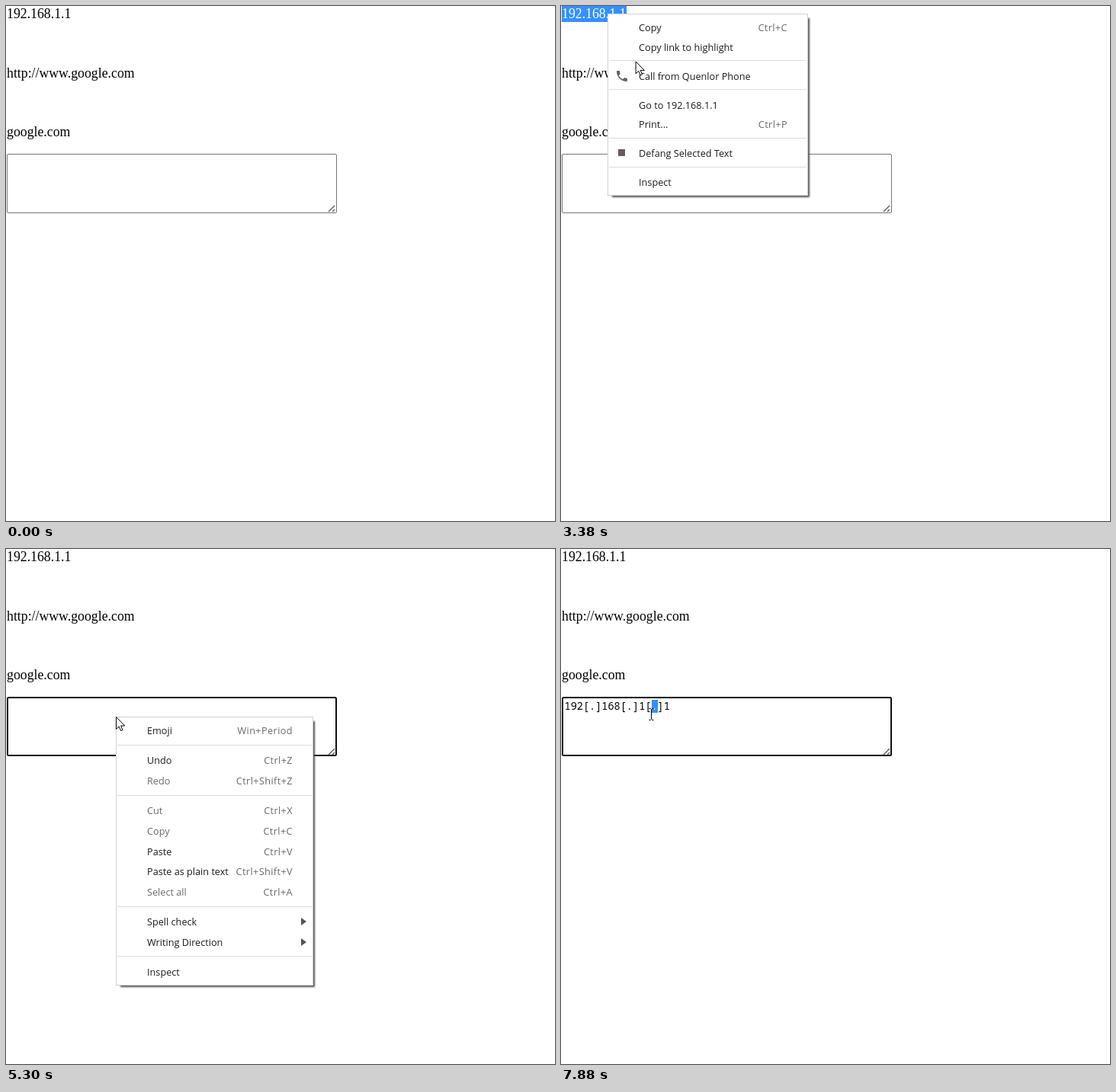
Animation of 720x676 px, one loop 8 s. Source, as an HTML page:

```html
<!DOCTYPE html>
<html lang="en">
<head>
<meta charset="utf-8">
<style>
  html, body { margin: 0; width: 100%; height: 100%; overflow: hidden; background: #fff; }
  svg { display: block; }
  .page { font: 17.78px "Liberation Serif", "Times New Roman", serif; }
  .mono { font: 13.57px "Noto Sans Mono", monospace; white-space: pre; }
  .menu { font: 12.7px "Open Sans", "Noto Sans", sans-serif; fill: #1c1c1c; }
  .menu .off, .menu .key { fill: #6a6a6a; }
  .key { text-anchor: end; letter-spacing: .4px; }
</style>
</head>
<body>
<svg id="stage" width="720" height="676" xmlns="http://www.w3.org/2000/svg">
  <defs><filter id="soft"><feGaussianBlur stdDeviation=".9"/></filter></defs>
  <g class="page">
    <rect id="ipMark" x="1" y="0" width="85" height="21" fill="#3390ff"/>
    <text id="ip" x="1" y="16">192.168.1.1</text>
    <text x="1" y="94">http://www.google.com</text>
    <text x="1" y="171">google.com</text>
  </g>
  <rect id="box" fill="#fff" rx="1.5"/>
  <path d="M423 270l8-8M428 270l3-3" stroke="#555" stroke-width="1.2"/>
  <rect id="dotMark" x="119" y="198" width="8" height="17" fill="#3390ff"/>
  <text id="pasted" class="mono" x="4.5" y="211">192[.]168[.]1[<tspan id="dot">.</tspan>]1</text>
  <rect id="caret" y="198" width="1" height="17"/>
  <g id="menus"></g>
  <path id="arrow" d="M.5.5V16.5L4.2 13 6.6 18.6 9 17.6 6.6 12.1H11.8Z" fill="#fff" stroke="#000"/>
  <path id="beam" d="M-3-7.5H-1L0-6.5 1-7.5H3M0-6.5V6.5M-3 7.5H-1L0 6.5 1 7.5H3" fill="none" stroke="#000"/>
</svg>
<script>
const LOOP = 8000;
const $ = id => document.getElementById(id);
const show = (id, on) => $(id).style.display = on ? "" : "none";
const attrs = (node, props) => {
  for (const k in props) node.setAttribute(k, props[k]);
  return node;
};
function add(parent, tag, props, text = "") {
  const node = attrs(document.createElementNS("http://www.w3.org/2000/svg", tag), props);
  node.textContent = text;
  return parent.appendChild(node);
}

// Items: [center y, label, shortcut, disabled]
function makeMenu({ x, y, w, h, keyX, half, seps, items, open, close }) {
  const g = add($("menus"), "g", { class: "menu" });
  add(g, "rect", { x: x + 6, y: y + 6, width: w - 4, height: h - 4, fill: "#555", filter: "url(#soft)" });
  add(g, "rect", { x: x + .5, y: y + .5, width: w - 1, height: h - 1, fill: "#fff", stroke: "#d2d2d2" });
  const bar = add(g, "rect", { x: x + 1, width: w - 2, height: half * 2, fill: "#e6e6e6" });
  for (const s of seps) add(g, "rect", { x: x + 2, y: s, width: w - 4, height: 1, fill: "#dcdcdc" });
  for (const [cy, label, key, off] of items) {
    add(g, "text", { x: x + 41, y: cy + 4.5, class: off ? "off" : "" }, label);
    if (key) add(g, "text", { x: keyX, y: cy + 4.5, class: "key" }, key);
  }
  const update = (t, px, py) => {
    const alpha = Math.min(clamp((t - open) / 130), clamp((close + 80 - t) / 80));
    g.style.opacity = alpha;
    g.style.display = alpha ? "" : "none";
    const hit = px > x && px < x + w && items.find(i => !i[3] && Math.abs(py - i[0]) < half);
    bar.style.display = hit ? "" : "none";
    if (hit) bar.setAttribute("y", hit[0] - half);
    return alpha > 0;
  };
  return { g, update };
}
const clamp = v => Math.max(0, Math.min(1, v));

const pageMenu = makeMenu({
  x: 61, y: 10, w: 263, h: 239, keyX: 297, half: 13, open: 2660, close: 4230,
  seps: [71, 109, 173, 211],
  items: [
    [28, "Copy", "Ctrl+C"], [54, "Copy link to highlight"], [92, "Call from Quenlor Phone"],
    [130, "Go to 192.168.1.1"], [155, "Print...", "Ctrl+P"],
    [193, "Defang Selected Text"], [231, "Inspect"]
  ]
});
add(pageMenu.g, "path", {
  transform: "translate(70.7 82.8) scale(.77)", fill: "#5f6368",
  d: "M6.6 10.8c1.4 2.8 3.8 5.1 6.6 6.6l2.2-2.2c.3-.3.7-.4 1-.2 1.1.4 2.3.6 3.6.6.6 0 1 .4 1 1V20c0 .6-.4 1-1 1C10.600 21 3 13.400 3 4c0-.6.4-1 1-1h3.500c.6 0 1 .4 1 1 0 1.200.2 2.400.6 3.600.1.300 0 .700-.2 1z"
});
add(pageMenu.g, "rect", { x: 75, y: 188, width: 9, height: 9, fill: "#6b5a60" });

const editMenu = makeMenu({
  x: 144, y: 220, w: 259, h: 353, keyX: 376, half: 13.5, open: 5150, close: 6640,
  seps: [257, 323, 469, 534],
  items: [
    [238, "Emoji", "Win+Period"], [277, "Undo", "Ctrl+Z"], [304, "Redo", "Ctrl+Shift+Z", true],
    [343, "Cut", "Ctrl+X", true], [370, "Copy", "Ctrl+C", true], [397, "Paste", "Ctrl+V"],
    [423, "Paste as plain text", "Ctrl+Shift+V"], [450, "Select all", "Ctrl+A", true],
    [489, "Spell check"], [516, "Writing Direction"], [555, "Inspect"]
  ]
});
for (const y of [489, 516]) add(editMenu.g, "path", { d: `M387 ${y - 5}l7 5-7 5z`, fill: "#555" });

// Pointer stops: time, x, y
const stops = [
  [700, 652, 672], [1520, 320.5, 238.5], [1590, 320.5, 238.5], [2120, 68, 12], [2260, 68, 12],
  [2320, 61, 10], [3100, 61, 10], [3780, 159.5, 178], [3960, 159.5, 178], [4100, 164, 191],
  [4500, 164, 191], [4880, 144, 220], [5600, 144, 220], [6100, 229.5, 422], [6250, 233, 431],
  [6430, 232, 427], [6680, 232, 427], [7020, 136, 216], [7150, 136, 216], [7290, 126, 212],
  [7540, 126, 212], [7880, 118.500, 217]
];
function pointer(t) {
  const i = stops.findIndex(s => s[0] > t);
  if (i < 1) return stops.at(i).slice(1);
  const [a, b] = [stops[i - 1], stops[i]];
  const u = (t - a[0]) / (b[0] - a[0]), e = u * u * (3 - 2 * u);
  return [1, 2].map(k => a[k] + (b[k] - a[k]) * e);
}

function draw(t) {
  const [x, y] = pointer(t);
  const inBox = x < 434 && y >= 194 && y < 272;
  const overText = [[0, 86], [78, 169], [155, 85]].some(([top, w]) => x < w && y >= top && y < top + 21);
  const menuOpen = [pageMenu, editMenu].map(m => m.update(t, x, y)).some(Boolean);
  const beam = !menuOpen && (inBox || overText);
  show("arrow", t >= 730 && !beam);
  show("beam", t >= 730 && beam);
  attrs($("arrow"), { transform: `translate(${x} ${y})` });
  attrs($("beam"), { transform: `translate(${x} ${y})` });

  const marked = t >= 2460 && t < 4620;
  show("ipMark", marked);
  attrs($("ip"), { fill: marked ? "#fff" : "#000" });

  const focus = t >= 4620, lw = focus ? 2 : 1;
  attrs($("box"), {
    x: 1 + lw / 2, y: 194 + lw / 2, width: 433 - lw, height: 78 - lw, "stroke-width": lw,
    stroke: focus ? "#101010" : inBox && !menuOpen ? "#4f4f4f" : "#767676"
  });

  const picked = t >= 7750;
  show("pasted", t >= 6700);
  show("dotMark", picked);
  attrs($("dot"), { fill: picked ? "#fff" : "#000" });

  const [since, cx] = t >= 7290 ? [7290, 126] : t >= 6700 ? [6700, 142.500] : [4620, 4];
  show("caret", focus && !picked && (t - since) % 1000 < 500);
  attrs($("caret"), { x: cx });
}

const start = performance.now();
function tick() {
  draw((performance.now() - start) % LOOP);
  requestAnimationFrame(tick);
}
tick();
</script>
</body>
</html>
```
